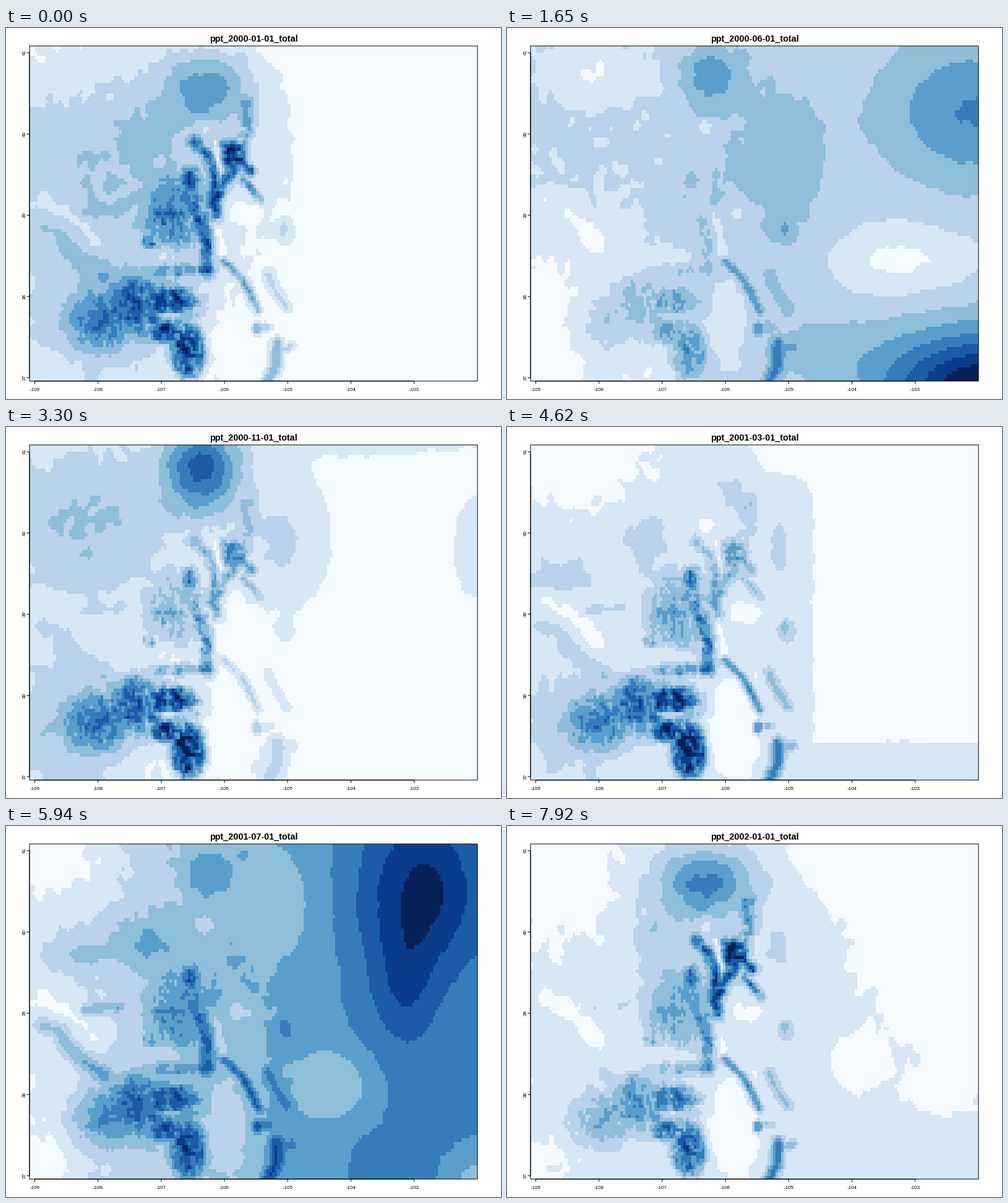
A matplotlib script that plays this animation: 800x600 px, repeating every 8000 ms.

```python
import numpy as np
import matplotlib.pyplot as plt
from matplotlib.animation import FuncAnimation
from matplotlib.colors import ListedColormap
from matplotlib.patches import Rectangle

plt.rcParams["font.family"] = "Liberation Sans"
W, H, DPI = 800, 600, 100
PT = 72 / DPI
LEFT, TOP, RIGHT, BOTTOM = 38, 29, 762, 571
COLS, ROWS = 170, 99
STEP, TICK, FRAMES = 330, 40, 200
BLUES = ["#f5fafe", "#d8e7f5", "#bad2eb", "#8fbeda", "#5a9ecc",
         "#347dba", "#1b5ba7", "#0a3c8b", "#082058"]

X, Y = np.meshgrid(LEFT + (np.arange(COLS) + .5) * (RIGHT - LEFT) / COLS,
                   TOP + (np.arange(ROWS) + .5) * (BOTTOM - TOP) / ROWS)


# Building blocks, all in stage pixels --------------------------------
def hill(x, y, rx, ry):
    return np.exp(-((X - x) / rx) ** 2 - ((Y - y) / ry) ** 2)


def mesa(x, y, rx, ry):
    return np.exp(-(((X - x) / rx) ** 2 + ((Y - y) / ry) ** 2) ** 2)


def ramp(x0, y0, x1, y1):
    dx, dy = x1 - x0, y1 - y0
    return np.clip(((X - x0) * dx + (Y - y0) * dy) / (dx * dx + dy * dy), 0, 1)


def edge(v, soft):
    return 1 / (1 + np.exp(-v / soft))


def ridge(width, *path):
    best = np.full(X.shape, np.inf)
    for (x0, y0), (x1, y1) in zip(path, path[1:]):
        t = ramp(x0, y0, x1, y1)
        best = np.minimum(best, np.hypot(X - x0 - t * (x1 - x0), Y - y0 - t * (y1 - y0)))
    return np.exp(-(best / width) ** 2)


def top(*parts):
    return np.maximum.reduce(parts)


def noise(rng, passes):
    a = rng.uniform(-1, 1, X.shape)
    for _ in range(passes):
        p = np.pad(a, 1, mode="edge")
        a = (p[:-2, 1:-1] + p[2:, 1:-1] + p[1:-1, :-2] + p[1:-1, 2:] + 2 * a) / 6
    return a / a.std()


rng = np.random.RandomState(11)
GRAIN = 1 + .2 * noise(rng, 1)
PATCH = noise(rng, 5) * (.03 + .1 * edge(425 - X, 15))

# Terrain shared by all months ----------------------------------------
san_juan = GRAIN * (top(.4 * mesa(155, 475, 58, 50), .52 * mesa(232, 455, 84, 52),
                        .64 * mesa(207, 450, 34, 50), .88 * mesa(268, 442, 44, 26),
                        .9 * mesa(262, 492, 32, 20), mesa(294, 522, 29, 48),
                        .42 * mesa(278, 393, 48, 12))
                    - .4 * mesa(262, 465, 20, 6))
elk = GRAIN * top(.5 * mesa(280, 300, 56, 66), .64 * mesa(268, 300, 38, 30),
                  .95 * ridge(13, (297, 238), (300, 285), (318, 315), (324, 350), (326, 390)),
                  .6 * mesa(232, 346, 12, 12))
front = GRAIN * (top(mesa(369, 206, 22, 24), .42 * ridge(12, (388, 125), (390, 165), (380, 195)),
                     .8 * ridge(10, (372, 222), (352, 252), (336, 282), (340, 304)),
                     .68 * ridge(9, (304, 184), (323, 203), (338, 235), (335, 270)),
                     .8 * ridge(9, (355, 190), (396, 232)),
                     .5 * ridge(7, (384, 245), (412, 278)))
                 - .3 * ridge(3, (338, 184), (347, 232)))
sangre = top(.82 * ridge(7, (352, 377), (380, 404), (395, 430), (408, 457)),
             .8 * mesa(406, 486, 9, 11), .4 * mesa(418, 484, 16, 8),
             .88 * ridge(11, (438, 512), (437, 545), (424, 571)),
             .5 * ridge(8, (440, 522), (462, 515)),
             .4 * ridge(10, (423, 397), (435, 425), (454, 452)),
             .5 * mesa(449, 325, 9, 11), .25 * mesa(452, 330, 16, 20))
plateau = top(ridge(13, (58, 322), (84, 330), (104, 364), (156, 402)),
              .9 * ridge(8, (126, 297), (182, 292)))
valley = top(ridge(8, (336, 298), (345, 340), (350, 368)), .9 * mesa(382, 300, 30, 20),
             .8 * mesa(318, 158, 18, 16), .6 * mesa(255, 366, 42, 10),
             .8 * ridge(15, (66, 280), (108, 302), (148, 350)))


def month(rain, s, e, f, g, p, v):
    """Rain field plus the lift each mountain group adds to it."""
    return (rain + s * san_juan + e * elk + f * front + g * sangre
            + p * plateau - v * valley + PATCH)


KEYS = {
    0: month(.35 + 2.6 * hill(180, 220, 240, 180) + 3.3 * hill(325, 95, 75, 60)
             + .8 * hill(232, 172, 45, 40) + 2.4 * hill(150, 470, 150, 130),
             5.4, 4.8, 5.6, 3.8, .8, 1.1),
    5: month(2.2 - 1.2 * hill(150, 75, 85, 45) + 2.3 * hill(327, 78, 50, 55)
             + 1.3 * hill(440, 230, 90, 170) + 2.9 * hill(755, 135, 150, 120)
             - 1.5 * hill(635, 375, 110, 55) + 7.2 * hill(775, 590, 165, 100)
             + .9 * hill(500, 520, 130, 60) - 2.2 * hill(30, 520, 115, 180)
             - .6 * hill(190, 350, 110, 80) - .9 * hill(360, 480, 40, 80)
             - .9 * hill(215, 560, 55, 55),
             2.2, 1, .5, 3, 0, 1),
    10: month(.5 + 2.6 * hill(130, 150, 170, 150) + 5.4 * hill(318, 65, 62, 75)
              + 1.6 * hill(445, 185, 75, 110) + .9 * hill(770, 190, 60, 110)
              + hill(600, 0, 200, 55) + 2.5 * hill(100, 490, 130, 140)
              + .6 * hill(430, 540, 60, 60),
              6.6, 4, 3.5, 2, .6, .3),
    14: month(.4 + 1.1 * top(edge(497 - X, 12), edge(Y - 508, 12))
              - 1.3 * hill(90, 30, 150, 105) - 1.1 * hill(450, 25, 70, 60)
              + 1.2 * hill(225, 180, 38, 50) + hill(85, 240, 55, 30)
              + .9 * hill(440, 195, 18, 50) + .8 * hill(370, 105, 35, 40)
              + 1.2 * hill(100, 480, 80, 80) - 1.3 * hill(365, 490, 45, 100),
              6.4, 4.3, 2.8, 4.8, .9, 1),
    18: month(1 + 4.2 * ramp(20, 300, 580, 300) + 3.1 * hill(675, 105, 95, 130)
              + 1.6 * hill(645, 260, 50, 100) - .9 * hill(110, 60, 90, 60)
              + 1.6 * hill(225, 190, 65, 45) + 1.3 * hill(110, 205, 60, 35)
              + 1.7 * hill(325, 78, 35, 38) - .9 * hill(450, 130, 50, 75)
              - 1.8 * hill(535, 420, 60, 60) - 1.5 * hill(760, 570, 45, 45)
              - 1.2 * hill(360, 490, 42, 90) - .8 * hill(50, 550, 70, 60)
              + 1.5 * hill(190, 460, 75, 55),
              3.6, 3.2, .4, 3.4, 2, 1),
    20: month(1.4 + 3 * ramp(500, 400, 500, 170) * ramp(110, 0, 330, 0)
              + 4.3 * ramp(560, 180, 730, 80) + 2.1 * hill(323, 80, 38, 38)
              - .9 * hill(50, 190, 70, 120) - .9 * hill(415, 60, 25, 45)
              + 1.3 * hill(560, 520, 110, 75) + .8 * hill(600, 560, 40, 40)
              - 1.1 * hill(60, 560, 80, 80) - .9 * hill(352, 490, 38, 80)
              + .9 * hill(185, 455, 65, 50),
              1.6, .7, 1.4, 1.8, .7, .7),
    24: month(1.35 - 1.1 * hill(60, 60, 130, 130) - 1.1 * hill(760, 150, 190, 230)
              - hill(560, 20, 110, 90) - .5 * hill(700, 430, 60, 40)
              - .9 * hill(565, 385, 38, 42) + 3.9 * hill(320, 92, 80, 55)
              + 1.1 * hill(285, 240, 95, 110) + .8 * hill(440, 195, 35, 50)
              + .9 * hill(232, 170, 35, 30) + .4 * hill(175, 460, 70, 60)
              - hill(365, 485, 42, 90) - .5 * hill(50, 550, 60, 60),
              4.4, 3.3, 6, 4.6, .4, .9),
}


def levels(m):
    """Nine colour classes; months between keys blend and fill the scale."""
    if m in KEYS:
        field = KEYS[m]
    else:
        a = max(k for k in KEYS if k < m)
        b = min(k for k in KEYS if k > m)
        t = (m - a) / (b - a)
        field = (1 - t) * KEYS[a] + t * KEYS[b]
        lo, hi = np.percentile(field, [.5, 99.5])
        field = .4 + (field - lo) * 7.8 / (hi - lo)
    return np.clip(np.floor(field), 0, 8)


LEVELS = [levels(m) for m in range(25)]

# Figure --------------------------------------------------------------
fig = plt.figure(figsize=(W / DPI, H / DPI), dpi=DPI, facecolor="white")
ax = fig.add_axes([0, 0, 1, 1])
ax.axis("off")
grid = ax.imshow(LEVELS[0], cmap=ListedColormap(BLUES), vmin=-.5, vmax=8.5,
                 extent=(LEFT, RIGHT, BOTTOM, TOP), interpolation="nearest", aspect="auto")
ax.set_xlim(0, W)
ax.set_ylim(H, 0)
ax.add_patch(Rectangle((LEFT, TOP), RIGHT - LEFT, BOTTOM - TOP, fill=False,
                       ec="black", lw=PT, snap=False))


def line(xs, ys):
    ax.plot(xs, ys, color="black", lw=PT, solid_capstyle="butt", snap=False)


def label(x, y, s, size, **kw):
    return ax.text(x, y, s, size=size * PT, ha="center", va="baseline",
                   rotation_mode="anchor", **kw)


lon = [46.5 + 102.2 * i for i in range(7)]
lat = [565.7 - 131.45 * i for i in range(5)]
line([lon[0], lon[-1]], [BOTTOM, BOTTOM])
line([LEFT, LEFT], [lat[0], lat[-1]])
for i, x in enumerate(lon):
    line([x, x], [BOTTOM, BOTTOM + 4.5])
    label(x, 587, f"-{109 - i}", 8)
for i, y in enumerate(lat):
    line([LEFT - 4.5, LEFT], [y, y])
    label(32, y, f"{37 + i}", 8, rotation=90)
title = label(400, 22, "", 14.4, weight="bold")


def draw(i):
    m = min((i * TICK + TICK - 10) // STEP, 24)
    grid.set_data(LEVELS[m])
    title.set_text(f"ppt_{2000 + m // 12}-{m % 12 + 1:02d}-01_total")
    return grid, title


anim = FuncAnimation(fig, draw, frames=FRAMES, interval=TICK, repeat=True, repeat_delay=0)
plt.show()
```
